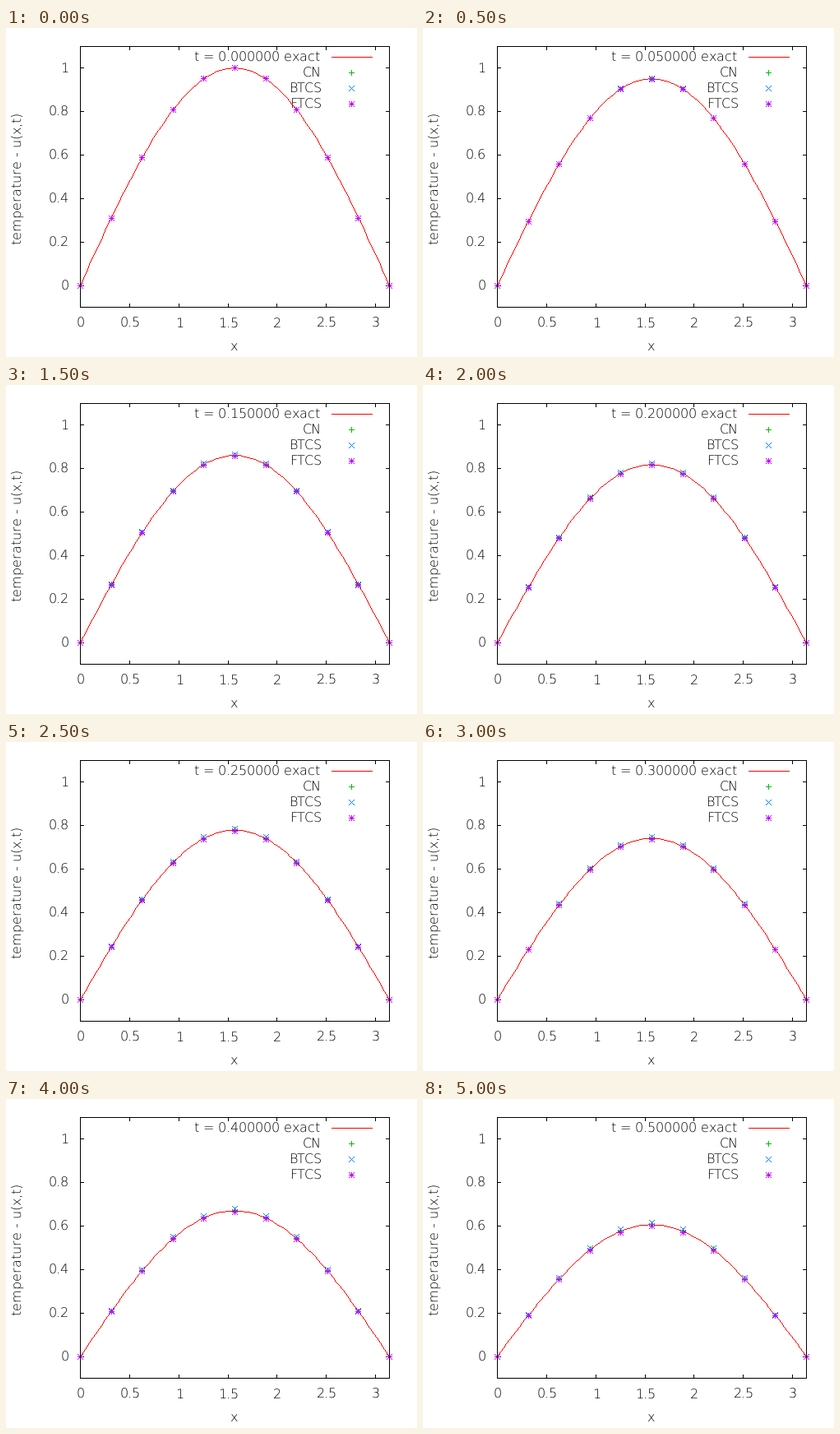
A matplotlib script that plays this animation: 500 px wide and 400 px high, repeating every 5.5 s.

```python
import numpy as np
import matplotlib.pyplot as plt
from matplotlib.animation import FuncAnimation

W, H, DPI = 500, 400, 100
LEFT, RIGHT, TOP, BOTTOM = 90, 466, 22, 339
STEPS, DT, CELLS = 11, 0.05, 10

BLACK, RED, GREEN = (0, 0, 0), (255, 0, 0), (0, 192, 0)
BLUE, MAGENTA = (0, 128, 255), (192, 0, 255)

# Decay per time step of the sine mode in each scheme
k = 4 * DT / (np.pi / CELLS) ** 2 * np.sin(np.pi / CELLS / 2) ** 2
CN, BTCS, FTCS = (1 - k / 2) / (1 + k / 2), 1 / (1 + k), 1 - k

PLUS = [(-3, 0, 3, 0), (0, -3, 0, 3)]
CROSS = [(-3, -3, 3, 3), (-3, 3, 3, -3)]
SCHEMES = [("CN", PLUS, CN, GREEN), ("BTCS", CROSS, BTCS, BLUE),
           ("FTCS", PLUS + CROSS, FTCS, MAGENTA)]


def px(x):
    return np.floor(LEFT + np.asarray(x) * (RIGHT - LEFT) / np.pi + 0.5).astype(int)


def py(u):
    return np.floor(BOTTOM - (np.asarray(u) + 0.1) * (BOTTOM - TOP) / 1.2 + 0.5).astype(int)


def line(img, x0, y0, x1, y1, color):
    """Bresenham line, walked upwards along its longer axis."""
    steep = abs(y1 - y0) > abs(x1 - x0)
    (a0, b0), (a1, b1) = sorted([(y0, x0), (y1, x1)] if steep else [(x0, y0), (x1, y1)])
    n = max(a1 - a0, 1)
    i = np.arange(a1 - a0 + 1)
    a, b = a0 + i, b0 + np.sign(b1 - b0) * ((2 * i * abs(b1 - b0) + n) // (2 * n))
    img[(a, b) if steep else (b, a)] = (*color, 255)


def mark(img, shape, x, y, color):
    for x0, y0, x1, y1 in shape:
        line(img, x + x0, y + y0, x + x1, y + y1, color)


def draw_frame(img):
    for y in (TOP, BOTTOM):
        line(img, LEFT, y, RIGHT, y, BLACK)
    for x in (LEFT, RIGHT):
        line(img, x, TOP, x, BOTTOM, BLACK)


def draw_ticks(img):
    for x in px(np.arange(7) / 2):
        line(img, x, TOP, x, TOP + 4, BLACK)
        line(img, x, BOTTOM, x, BOTTOM - 4, BLACK)
    for y in py(np.arange(6) / 5):
        line(img, LEFT, y, LEFT + 4, y, BLACK)
        line(img, RIGHT, y, RIGHT - 4, y, BLACK)


def render(step):
    img = np.zeros((H, W, 4), np.uint8)
    draw_ticks(img)

    x = np.linspace(0, np.pi, 100)
    xs, ys = px(x), py(np.exp(-step * DT) * np.sin(x))
    for i in range(len(xs) - 1):
        line(img, xs[i], ys[i], xs[i + 1], ys[i + 1], RED)
    line(img, 396, 35, 445, 35, RED)

    nodes = np.linspace(0, np.pi, CELLS + 1)
    for i, (_, shape, factor, color) in enumerate(SCHEMES):
        for mx, my in zip(px(nodes), py(factor ** step * np.sin(nodes))):
            mark(img, shape, mx, my, color)
        mark(img, shape, 420, 54 + 19 * i, color)

    draw_frame(img)
    return img


plt.rcParams.update({"font.family": "DejaVu Sans", "font.weight": 200,
                     "text.hinting": "default", "text.hinting_factor": 1})
fig = plt.figure(figsize=(W / DPI, H / DPI), dpi=DPI, facecolor="white")
ax = fig.add_axes([0, 0, 1, 1])
ax.axis("off")
picture = ax.imshow(render(0), interpolation="nearest", aspect="auto", zorder=5)
ax.set_xlim(-0.5, W - 0.5)
ax.set_ylim(H - 0.5, -0.5)


def label(x, y, s, ha="center", **kw):
    return ax.text(x, y, s, ha=ha, va="baseline", fontsize=16 * 72 / DPI,
                   color="black", zorder=2, **kw)


for i in range(7):
    label(px(i / 2) + 0.5, 363.5, f"{i / 2:g}")
for i in range(6):
    label(76, py(i / 5) + 5.5, f"{i / 5:g}", "right")
label(276, 391.5, "x")
label(18.5, 182.5, "temperature - u(x,t)", rotation=90, rotation_mode="anchor")
for i, (name, *_) in enumerate(SCHEMES):
    label(383.5, 59.5 + 19 * i, name, "right")
title = label(381.5, 40.5, "", "right")


def update(step):
    picture.set_data(render(step))
    title.set_text(f"t = {step * DT:.6f} exact")
    return picture, title


anim = FuncAnimation(fig, update, frames=STEPS, interval=500, repeat=True, repeat_delay=0)
plt.show()
```
